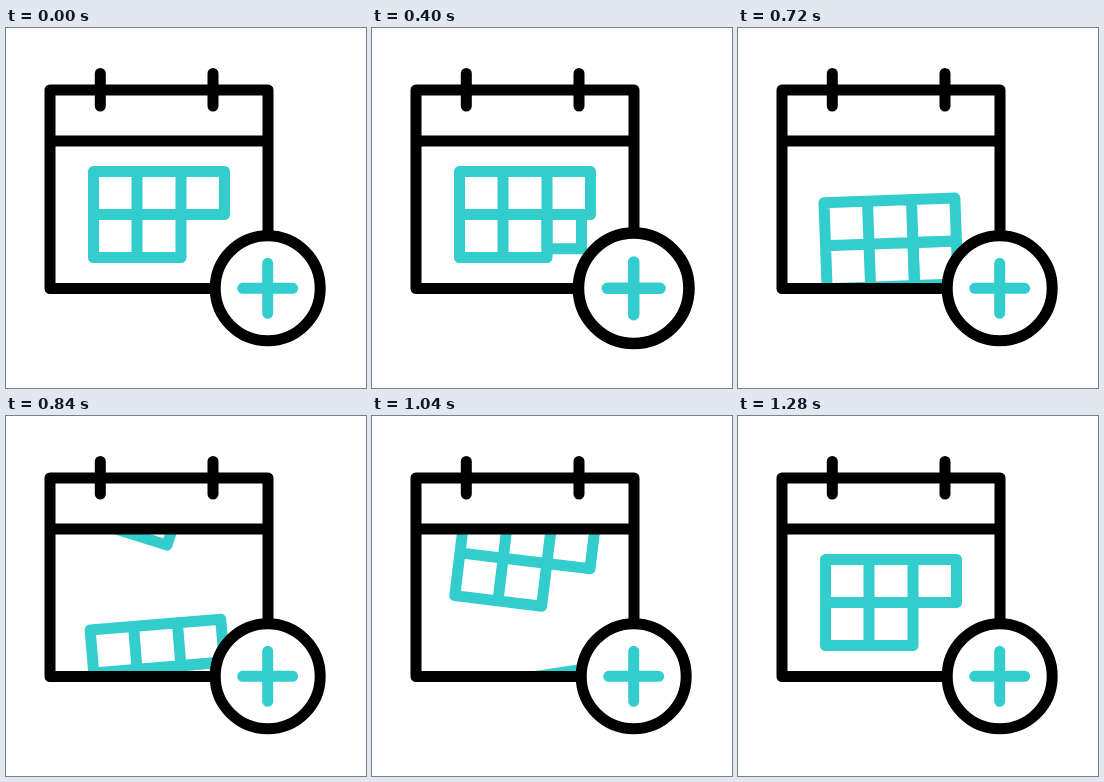
Animation of 360x360 px, one loop 1480 ms. Source, as an HTML page:

```html
<!DOCTYPE html>
<html lang="en">
<head>
<meta charset="utf-8">
<title>Add to calendar</title>
<style>
  html, body { margin: 0; height: 100%; overflow: hidden; background: #fff; }
  svg { display: block; width: 100vw; height: 100vh; }
  .line { fill: none; stroke: #000; stroke-width: 11; stroke-linecap: round; stroke-linejoin: round; }
  .teal { stroke: #33cdcd; }
</style>
</head>
<body>
<svg viewBox="0 0 360 360">
  <defs>
    <clipPath id="page"><rect x="46" y="115" width="214" height="144"/></clipPath>
    <path id="cells" d="M87.5 143.5H218.5V186.5H87.5ZM87.5 186.5V229.5H175V143.5M131 143.5V229.5"/>
  </defs>
  <g clip-path="url(#page)" class="line teal">
    <g id="leaving"><use href="#cells"/><path id="newCell"/></g>
    <g id="entering"><use href="#cells"/></g>
  </g>
  <path class="line" d="M44 62H262V260.5H44ZM44 113H262M94.3 45.5V78M207 45.5V78"/>
  <g id="badge" class="line">
    <circle r="52.5" fill="#fff"/>
    <path class="teal" d="M-25 0H25M0-25V25"/>
  </g>
</svg>
<script>
  const LOOP = 1480, STEP = 40;
  const el = id => document.getElementById(id);
  const [leaving, entering, newCell, badge] = ['leaving', 'entering', 'newCell', 'badge'].map(el);

  // Sine ease-in-out from 0 to 1 between two times
  const ease = (t, start, end) => {
    const p = Math.min(1, Math.max(0, (t - start) / (end - start)));
    return (1 - Math.cos(Math.PI * p)) / 2;
  };

  const place = (grid, dy, angle) =>
    grid.setAttribute('transform', `translate(0 ${dy}) rotate(${angle} 153 186.5)`);

  function draw(t) {
    const pulse = 1 + 0.07 * (ease(t, 80, 320) - ease(t, 320, 560));
    badge.setAttribute('transform', `translate(261.7 260.3) scale(${pulse})`);

    const grow = ease(t, 120, 520);
    const w = 43.5 * grow, h = 43 * grow;
    newCell.setAttribute('d', `M175 186.5h${w}v${h}h${-w}z`);

    const out = ease(t, 520, 1160);
    place(leaving, 130 * out, -9.5 * out);

    const left = 1 - ease(t, 640, 1280);
    place(entering, -135 * left, 22.5 * left);
  }

  function tick(now) {
    draw(Math.floor(now % LOOP / STEP) * STEP);
    requestAnimationFrame(tick);
  }
  draw(0);
  requestAnimationFrame(tick);
</script>
</body>
</html>
```
